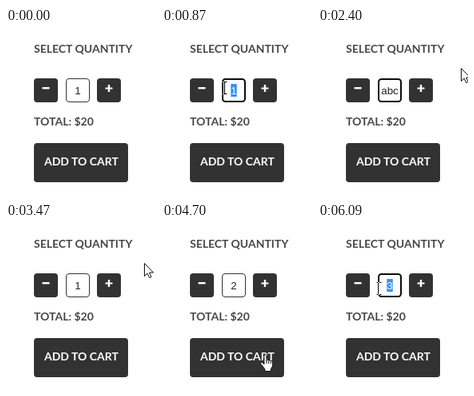
An HTML page for the animation above (6260 ms loop, 188 px wide and 209 px high).

```html
<!DOCTYPE html>
<html lang="en">
<head>
<meta charset="utf-8">
<title>Select quantity</title>
<style>
  html, body { margin: 0; width: 100%; height: 100%; overflow: hidden; background: #fff; }
  svg { display: block; width: 188px; height: 209px; }
  .label { font: 700 14px Lato, sans-serif; fill: #484848; }
  .button { fill: #323232; }
  .label.light, .light { fill: #fff; }
  #box { fill: #fff; stroke: #333; }
  #box.focus { stroke: #0c0c0c; stroke-width: 2; }
  #value { font: 13.333px "Liberation Sans", Arial, sans-serif; fill: #222; text-anchor: middle; }
  #value.selected { fill: #fff; }
  #mark { fill: #3390f8; }
  .cursor path { fill: #fff; stroke: #111; stroke-linejoin: round; }
  #beam { mix-blend-mode: difference; }
  #beam path { fill: none; stroke: #fff; }
</style>
</head>
<body>
<svg viewBox="0 0 188 209">
  <rect width="188" height="209" fill="#fff"/>
  <text class="label" x="35" y="31">SELECT QUANTITY</text>

  <rect class="button" x="35" y="63" width="30" height="30" rx="4"/>
  <rect class="light" x="45.5" y="74" width="9" height="2.4"/>
  <rect class="button" x="114" y="63" width="30" height="30" rx="4"/>
  <path class="light" d="M124.5 74.4h3.3v-3.4h2.4v3.4h3.3v2.2h-3.3v3.4h-2.4v-3.4h-3.3z"/>

  <rect id="box" rx="3.5"/>
  <rect id="mark" y="70" height="16"/>
  <text id="value" x="90" y="83">1</text>
  <rect id="caret" y="70" width="1" height="16" fill="#111"/>

  <text class="label" x="35" y="122">TOTAL: $20</text>
  <rect class="button" x="35" y="144" width="118" height="49" rx="4"/>
  <text class="label light" x="94.4" y="172" text-anchor="middle">ADD TO CART</text>

  <g id="arrow" class="cursor">
    <path d="M.5.5V16.5L4.2 13L6.8 18.6L9.2 17.5L6.7 12H11.7Z"/>
  </g>
  <g id="hand" class="cursor">
    <g transform="translate(-6 0)">
      <path d="M5 13V2a1.5 1.5 0 0 1 3 0V8.5a1.4 1.4 0 0 1 2.7 0a1.4 1.4 0 0 1 2.6.7a1.3 1.3 0 0 1 2.4.8V15L13.5 18.5V21.5H6V19L1 12.5C0 10.5 2.3 9.5 3.5 11Z"/>
      <path d="M8 8.5V12M10.7 9V12M13.3 9.5V12"/>
    </g>
  </g>
  <g id="beam" class="cursor">
    <path d="M-2.5-7.5H3.5M.5-7.5V7.5M-2.5 7.5H3.5"/>
  </g>
</svg>
<script>
  const LOOP = 6260;
  const TICK = 78;
  const $ = id => document.getElementById(id);
  const show = (el, on) => el.setAttribute('visibility', on ? 'visible' : 'hidden');
  const between = (t, from, to) => t >= from && t < to;

  // Pointer moves: start, duration, destination.
  const moves = [
    [70, 560, 97, 68],    // to the field
    [700, 100, 66, 72],   // drag over the digit
    [870, 0, 78, 75],
    [1230, 240, 122, 66], // aside while typing
    [1780, 330, 141, 57],
    [2320, 80, 179, 50],
    [3470, 0, 173, 50],   // back, to the plus button
    [3550, 470, 123, 82],
    [4700, 0, 129, 164],  // glance at the cart button
    [4800, 0, 127, 130],
    [4950, 220, 120, 72], // plus again
    [5350, 210, 109, 76],
    [5640, 150, 97, 68],  // second drag
    [5860, 80, 67, 77],
    [6040, 50, 76, 82]
  ];

  function pointerAt(t) {
    let x = 125, y = 155;
    for (const [start, span, toX, toY] of moves) {
      if (t < start) break;
      const jumps = Math.round(span / TICK);
      const done = span ? Math.floor((t - start) / span * jumps) : 0;
      const k = Math.min(1, (done + 1) / (jumps + 1));
      x += (toX - x) * k;
      y += (toY - y) * k;
    }
    return [Math.round(x), Math.round(y)];
  }

  // The cursor's shape follows from what lies under it.
  function cursorAt(t, x, y, selected) {
    if (t < 70 || between(t, 2550, 3470)) return 'none';
    const row = between(y, 63, 93);
    if (row && x < 106 && (selected || x >= 75)) return 'beam';
    if (row && between(x, 114, 144)) return 'hand';
    return y >= 144 ? 'hand' : 'arrow';
  }

  function valueAt(t) {
    if (between(t, 1550, 2550)) return 'abc'.slice(0, 1 + Math.floor((t - 1550) / 200));
    const clicks = [4100, 5350].filter(click => t >= click).length;
    return String(1 + clicks);
  }

  function set(el, attrs) {
    for (const name in attrs) el.setAttribute(name, attrs[name]);
  }

  function draw(t) {
    const focus = between(t, 550, 2550) || t >= 5710;
    const selected = between(t, 700, 1550) || t >= 5860;

    const inset = focus ? 1 : 0.5;
    const side = 30 - 2 * inset;
    set($('box'), { x: 75 + inset, y: 63 + inset, width: side, height: side });
    $('box').classList.toggle('focus', focus);

    const value = $('value');
    value.textContent = valueAt(t);
    value.classList.toggle('selected', selected);
    const width = value.getComputedTextLength();
    set($('mark'), { x: 90 - width / 2, width });
    show($('mark'), selected);
    $('caret').setAttribute('x', Math.floor(90 + width / 2));
    show($('caret'), between(t, 1550, 2320));

    const [x, y] = pointerAt(t);
    const kind = cursorAt(t, x, y, selected);
    for (const id of ['arrow', 'hand', 'beam']) {
      show($(id), id === kind);
      $(id).setAttribute('transform', `translate(${x} ${y})`);
    }
  }

  const began = performance.now();
  function frame() {
    draw((performance.now() - began) % LOOP);
    requestAnimationFrame(frame);
  }
  frame();
</script>
</body>
</html>
```
